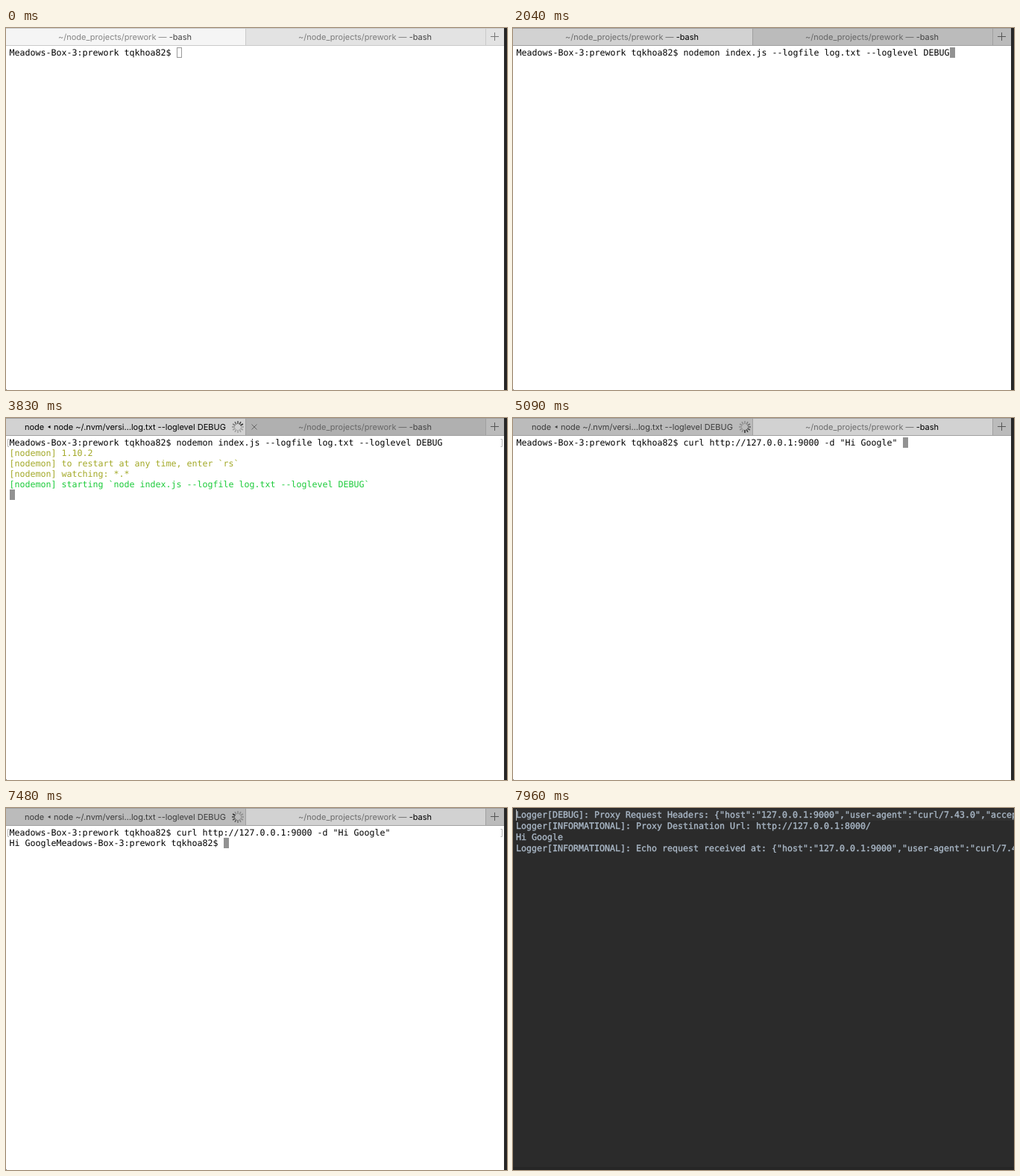
Write an HTML page with a canvas that moves like this. It is 672x486 px and loops after 8000 ms.

```html
<!DOCTYPE html>
<html lang="en">
<head>
<meta charset="utf-8">
<title>Terminal session</title>
<style>
  html, body { margin: 0; width: 100%; height: 100%; overflow: hidden; background: #fff; }
  canvas { display: block; }
</style>
</head>
<body>
<canvas id="stage" width="672" height="486"></canvas>
<script>
const W = 672, H = 486, LOOP = 8000;
const ctx = document.getElementById('stage').getContext('2d');
ctx.textRendering = 'geometricPrecision';

const MONO = '11.64px "DejaVu Sans Mono", "Liberation Mono", monospace';
const UI = '11px Inter, Roboto, sans-serif';
const CELL = 7.008, LEFT = 4.6, TOP = 26, ROW = 14;

const PROMPT = 'Meadows-Box-3:prework tqkhoa82$ ';
const ARGS = 'index.js --logfile log.txt --loglevel DEBUG';
const RUN = 'nodemon ' + ARGS;
const CURL = 'curl http://127.0.0.1:9000 -d "Hi Google" ';
const OLIVE = '#a3a928', GREEN = '#1ccb3a';

const NODEMON = [
  ['[nodemon] 1.10.2', OLIVE],
  ['[nodemon] to restart at any time, enter `rs`', OLIVE],
  ['[nodemon] watching: *.*', OLIVE],
  ['[nodemon] starting `node ' + ARGS + '`', GREEN]
];
const LOG = [
  'Logger[DEBUG]: Proxy Request Headers: {"host":"127.0.0.1:9000","user-agent":"curl/7.43.0","accept":"*/*"}',
  'Logger[INFORMATIONAL]: Proxy Destination Url: http://127.0.0.1:8000/',
  'Hi Google',
  'Logger[INFORMATIONAL]: Echo request received at: {"host":"127.0.0.1:9000","user-agent":"curl/7.43.0"}'
];

// Moments of the session, in ms
const AT = {
  focus: 420, command: 1000, start: 2900, hover: 3500, swap: 4000,
  curl: 4600, send: 5920, reply: 6450, editor: 7520, log: 7830
};

function rect(x, y, w, h, color) {
  ctx.fillStyle = color;
  ctx.fillRect(x, y, w, h);
}

function text(str, x, y, font, color) {
  ctx.font = font;
  ctx.fillStyle = color;
  ctx.fillText(str, x, y);
  return x + ctx.measureText(str).width;
}

function line(points, color, width = 1) {
  ctx.strokeStyle = color;
  ctx.lineWidth = width;
  ctx.beginPath();
  points.forEach(([x, y]) => ctx.lineTo(x, y));
  ctx.stroke();
}

function termLine(str, row, color = '#000') {
  text(str, LEFT, TOP + row * ROW + 11, MONO, color);
}

function logLine(str, row) {
  const x = 4, y = 13 + row * 15, color = '#a9b7c6';
  text(str, x, y, MONO, color);
  ctx.strokeStyle = color;
  ctx.lineWidth = 0.35;
  ctx.strokeText(str, x, y);
}

function cursor(col, row, filled = true) {
  const x = Math.round(LEFT + col * CELL), y = TOP + row * ROW;
  if (filled) return rect(x, y, 7, ROW, '#929292');
  ctx.strokeStyle = '#999';
  ctx.lineWidth = 1;
  ctx.strokeRect(x + 0.5, y + 0.5, 6, ROW - 1);
}

function brackets() {
  const a = TOP + 2.5, b = TOP + 12.5;
  line([[4, a], [2.5, a], [2.5, b], [4, b]], '#b5b5b5');
  line([[663.5, a], [665.5, a], [665.5, b], [663.5, b]], '#b5b5b5');
}

function spinner(x, y, t) {
  const step = Math.floor(t * 12 / 1000) + 2;
  for (let i = 0; i < 12; i++) {
    const a = i * Math.PI / 6, age = (step - i + 12) % 12;
    const c = Math.cos(a), s = Math.sin(a);
    ctx.globalAlpha = Math.max(0.3, 0.95 - age * 0.11);
    line([[x + c * 4, y + s * 4], [x + c * 8, y + s * 8]], '#222', 1.5);
  }
  ctx.globalAlpha = 1;
}

function shellTitle(x, dim, strong) {
  const end = text('~/node_projects/prework — ', x, 16, UI, dim);
  text('-bash', end, 16, UI, strong);
}

function nodeTitle(color, t) {
  text('node', 25, 16, UI, color);
  ctx.beginPath();
  ctx.moveTo(56, 12);
  ctx.lineTo(59.5, 10);
  ctx.lineTo(59.5, 14);
  ctx.fill();
  text('node ~/.nvm/versi…log.txt --loglevel DEBUG', 64, 16, UI, color);
  spinner(311, 12, t);
}

function tabs(t) {
  const focus = t >= AT.focus, second = t >= AT.swap;
  const hover = t >= AT.hover && !second;
  const on = focus ? '#d2d2d2' : '#f5f5f5';
  const off = focus ? '#bbb' : '#e3e3e3';
  const edge = focus ? '#a0a0a0' : '#cacaca';
  const dimOn = focus ? '#6c6c6c' : '#858585';
  const dimOff = focus ? '#666' : '#7c7c7c';
  const strong = focus ? '#000' : '#444';

  rect(0, 0, 321, 23, second ? off : on);
  rect(321, 0, 322, 23, second ? on : hover ? '#b0b0b0' : off);
  rect(643, 0, 25, 23, off);
  rect(0, 0, 668, 1, edge);
  rect(0, 23, 668, 1, edge);
  rect(321, 0, 1, 23, edge);
  rect(643, 0, 1, 23, edge);

  if (t >= AT.start) nodeTitle(second ? '#3b3b3b' : '#000', t);
  else shellTitle(70, dimOn, strong);
  shellTitle(392, second ? dimOn : dimOff, second ? '#000' : '#444');

  if (hover) {
    line([[329.5, 8.5], [336.5, 15.5]], '#666');
    line([[336.5, 8.5], [329.5, 15.5]], '#666');
  }
  const plus = focus ? '#555' : '#777';
  line([[650, 11.5], [661, 11.5]], plus);
  line([[655.5, 6], [655.5, 17]], plus);
}

function firstShell(t) {
  const cmd = t >= AT.command ? RUN : '';
  termLine(PROMPT + cmd, 0);
  if (t < AT.start) return cursor(PROMPT.length + cmd.length, 0, t >= AT.focus);
  brackets();
  NODEMON.forEach(([str, color], i) => termLine(str, i + 1, color));
  cursor(0, NODEMON.length + 1);
}

function secondShell(t) {
  const cmd = t >= AT.curl ? CURL : '';
  termLine(PROMPT + cmd, 0);
  if (t < AT.send) return cursor(PROMPT.length + cmd.length, 0);
  brackets();
  const reply = t >= AT.reply ? 'Hi Google' + PROMPT : '';
  termLine(reply, 1);
  cursor(reply.length, 1);
}

function terminal(t) {
  rect(0, 0, W, H, '#fff');
  tabs(t);
  if (t < AT.swap) firstShell(t);
  else secondShell(t);
  rect(668, 0, 4, H, '#262626');
  rect(0, H - 1, 1, 1, '#777');
}

function editor(t) {
  rect(0, 0, W, H, '#2b2b2b');
  rect(0, 2, W, 15, '#313131');
  rect(0, 482, W, 4, '#262626');
  if (t >= AT.log) LOG.forEach(logLine);
  rect(4, 2, 1, 15, '#bbb');
}

function draw() {
  const t = performance.now() % LOOP;
  if (t < AT.editor) terminal(t);
  else editor(t);
  requestAnimationFrame(draw);
}
draw();
</script>
</body>
</html>
```
